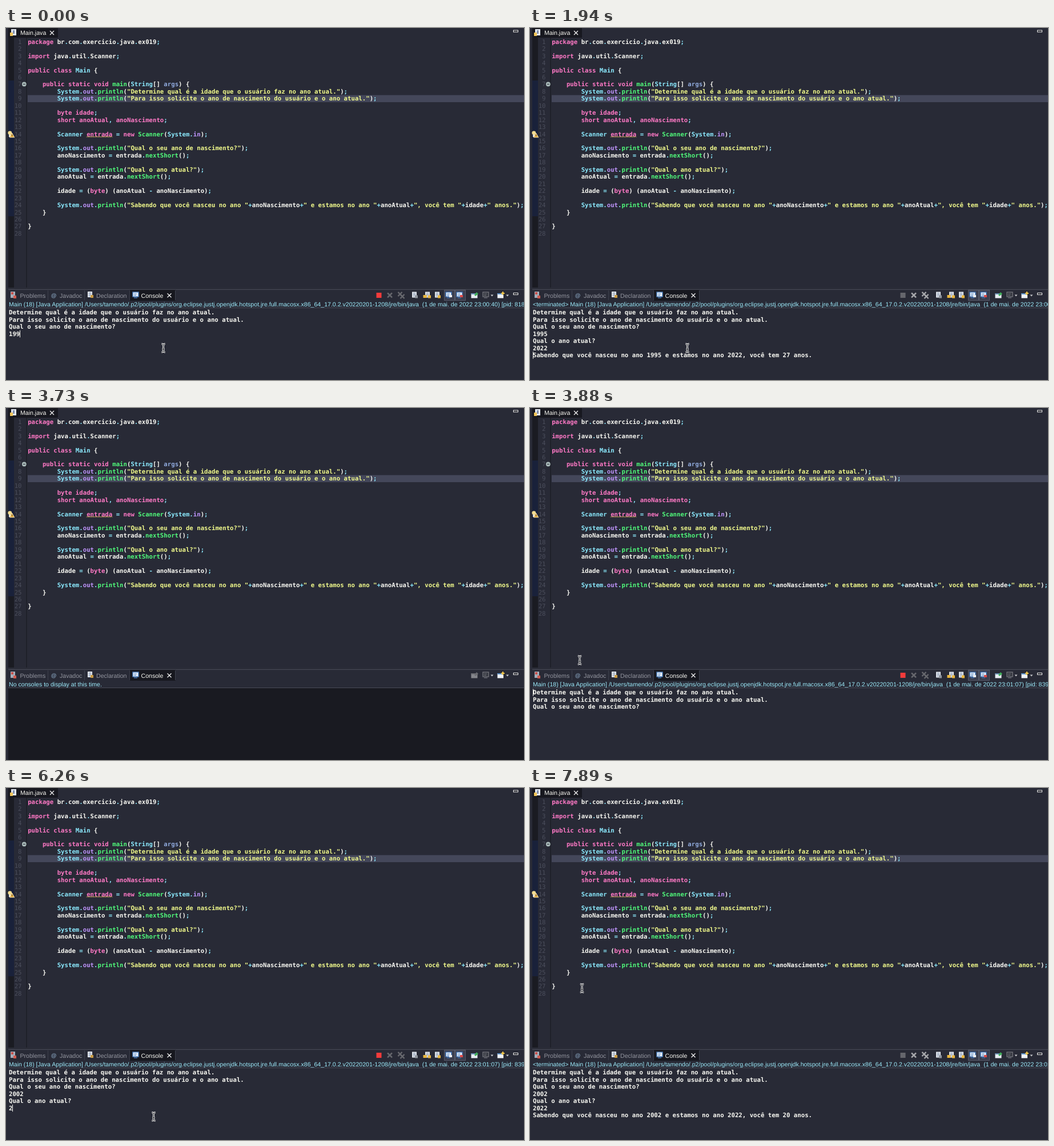
These frames come from a looping animation (907 by 617 pixels, 8 s). An HTML page:

```html
<!DOCTYPE html>
<html lang="pt-BR">
<head>
<meta charset="utf-8">
<title>Console</title>
<style>
  html, body { margin: 0; width: 100%; height: 100%; overflow: hidden; background: #282a36; }
  svg { display: block; width: 100vw; height: 100vh; }
  text { white-space: pre; text-rendering: geometricPrecision; }
  .mono { font: bold 10.7px "DejaVu Sans Mono", monospace; fill: #f8f8f2; }
  .num { font-weight: normal; fill: #4b4e5c; text-anchor: end; }
  .ui { font: 10.58px "Liberation Sans", Arial, sans-serif; fill: #93959f; }
  .status { fill: #9debfb; }
  .on { fill: #f8f8f2; }
  .key { fill: #ff79c6; } .type, .op { fill: #8be9fd; } .str { fill: #f1fa8c; }
  .fn { fill: #50fa7b; } .field { fill: #bd93f9; } .arg { fill: #8fa9dc; }
  .line { fill: none; }
</style>
</head>
<body>
<svg id="stage" viewBox="0 0 907 617" preserveAspectRatio="none"></svg>
<script>
const CHAR = 6.44, ROW = 12.45;

const code = `package br.com.exercicio.java.ex019;

import java.util.Scanner;

public class Main {

    public static void main(String[] args) {
        System.out.println("Determine qual é a idade que o usuário faz no ano atual.");
        System.out.println("Para isso solicite o ano de nascimento do usuário e o ano atual.");

        byte idade;
        short anoAtual, anoNascimento;

        Scanner entrada = new Scanner(System.in);

        System.out.println("Qual o seu ano de nascimento?");
        anoNascimento = entrada.nextShort();

        System.out.println("Qual o ano atual?");
        anoAtual = entrada.nextShort();

        idade = (byte) (anoAtual - anoNascimento);

        System.out.println("Sabendo que você nasceu no ano "+anoNascimento+" e estamos no ano "+anoAtual+", você tem "+idade+" anos.");
    }

}
`.split('\n');

const syntax = new RegExp([
  '(?<str>"[^"]*")',
  '(?<key>\\b(?:package|import|public|class|static|void|byte|short|new)\\b|idade(?=;)|anoAtual(?=,)|anoNascimento(?=;)|entrada(?= =))',
  '(?<fn>println|nextShort|\\bmain\\b|(?<=new )Scanner)',
  '(?<type>System|String|Main|(?<!\\.)Scanner)',
  '(?<field>(?<=System\\.)(?:out|in)\\b)',
  '(?<arg>\\bargs\\b)',
  '(?<op>[;.,=+-])'
].join('|'), 'g');

function highlight(line) {
  return line.replace(syntax, (token, ...rest) => {
    const groups = rest.at(-1);
    const kind = Object.keys(groups).find(name => groups[name]);
    return `<tspan class="${kind}">${token}</tspan>`;
  });
}

const rect = (x, y, w, h, fill, extra = '') =>
  `<rect x="${x}" y="${y}" width="${w}" height="${h}" fill="${fill}" ${extra}/>`;
const path = (d, stroke, width = 1, extra = '') =>
  `<path class="line" d="${d}" stroke="${stroke}" stroke-width="${width}" ${extra}/>`;
const label = (x, y, cls, content = '', id = '') =>
  `<text x="${x}" y="${y}" class="${cls}" id="${id}">${content}</text>`;
const cross = (x, y, r, stroke, width, extra) =>
  path(`M${x - r} ${y - r}l${2 * r} ${2 * r}m0 ${-2 * r}l${-2 * r} ${2 * r}`, stroke, width, extra);
const minimize = y => rect(888.5, y, 8, 3, '#17181f', 'stroke="#f0f0f0"');
const caretDown = x => `<path d="M${x - 2.5} 467.5h5l-2.5 3z" fill="#c8c8cc"/>`;
const page = (x, y, mark) =>
  rect(x, y, 8, 10, '#e8ecf2') +
  path(`M${x + 1.5} ${y + 2.5}h5m-5 2.5h5m-5 2.5h3`, '#6d7f9c') +
  rect(x + 5, y + 6, 5, 5, mark);
const monitor = (x, y, frame, screen) =>
  rect(x, y, 10, 8, screen, `stroke="${frame}" stroke-width="1.4"`) +
  path(`M${x + 2} ${y + 3}h5m-5 2.5h4`, frame) + path(`M${x + 2} ${y + 10}h6`, frame, 1.2);

// Light bulb with a warning triangle in front.
const warning = `<circle cx="6.8" cy="183.8" r="3.4" fill="#f6dd92"/>` +
  rect(5, 187, 4, 4, '#e4e2da') +
  `<path d="M10.6 184l4.2 7.8h-8.4z" fill="#eeb545" stroke="#f7e6bd" stroke-width="0.8"/>` +
  rect(10.1, 186.8, 1, 3, '#4a3a18');

function editor() {
  const rows = code.map((line, i) => {
    const y = 27.7 + i * ROW;
    return label(27.5, y, 'mono num', i + 1) + label(38.2, y, 'mono', highlight(line));
  }).join('');
  return rect(0, 0, 907, 617, '#282a36') +
    rect(4, 17, 10, 438, '#1a1b22') + rect(4, 92, 10, 238, '#19213a') +
    rect(35.5, 17, 1, 438, '#17181f') +
    rect(4, 0, 87, 17, '#17181f') +
    rect(9, 2, 9, 11, '#e4e9f1') + rect(12, 4, 3, 6, '#7f8fb0') + rect(7, 8, 5, 6, '#f0c65a') +
    label(25, 12, 'ui on', 'Main.java') + cross(80.5, 8.5, 3.5, '#f0f0f0', 1.3) + minimize(4) +
    rect(38, 117.6, 869, 12.4, '#44475a') + rows +
    `<circle cx="31.8" cy="98.5" r="3.9" fill="#a9bab9"/>` + path('M29.8 98.5h4', '#30333f', 1.2) +
    path('M141 191.5' + 'l1.5 -1.5l1.5 1.5'.repeat(15), '#f0d060', 0.9) + warning;
}

function toolbar() {
  const running = `<g id="tools">` +
    rect(648.5, 464, 9, 9, '#f23b3b', 'id="stop"') +
    `<g id="removers" stroke="#77787e">` +
    cross(672, 468.3, 4, 'inherit', 2.6, 'style="stroke:inherit"') +
    cross(690, 466.5, 3.6, 'inherit', 2.2, 'style="stroke:inherit"') +
    cross(694, 470.5, 3.6, 'inherit', 2.2, 'style="stroke:inherit"') + `</g>` +
    page(711, 462.5, '#8e939c') +
    page(734, 462.5, '#e9b63e') + rect(730.5, 468, 6, 5, '#e9b63e') +
    page(751, 462.5, '#e9b63e') +
    [767, 786].map((x, i) => rect(x + .5, 459.5, 18, 18, '#3b3e4f', 'stroke="#565968"') +
      monitor(x + 3, 463, '#3f74b8', '#f0f4fa') +
      rect(x + 9, 468, 5, 4, i ? '#d94a4a' : '#e9edf3')).join('') + `</g>`;
  return running +
    rect(814.5, 465, 11, 8.5, '#e7edf2', 'id="pinWindow"') +
    rect(814.5, 465, 11, 2, '#6a8fb5', 'id="pinBar"') +
    `<path id="pin" d="M820 468l4-5 3 3-5 4z" fill="#3fae5a"/>` +
    monitor(835, 463, '#6f7178', '#34363f') + caretDown(851) +
    rect(860.5, 465, 10.5, 8.5, '#f1f4f8') + rect(860.5, 465, 10.5, 2, '#5d94cb') +
    path('M870 462v6m-3-3h6', '#f3c548', 2) + caretDown(878) + minimize(464.5);
}

function panel() {
  return rect(0, 455, 907, 3, '#2b2d38') + rect(4, 458, 903, 1, '#484a56') +
    rect(4, 459, 903, 31, '#282a36') + rect(217, 459, 80, 19, '#17181f') +
    path('M73.5 460v17M137.5 460v17M216.5 460v17M296.5 460v17', '#3d404c') +
    rect(8, 462, 8, 11, '#a5acb8') + rect(9, 463, 4, 4, '#c9504a') + rect(13, 469, 5, 5, '#cf5a50') +
    label(24.5, 472.5, 'ui', 'Problems') +
    `<text x="79" y="472" class="ui" style="fill:#8eabc8;font-weight:bold;font-size:9.5px">@</text>` +
    label(94, 472.5, 'ui', 'Javadoc') + page(143, 462, '#c79a45') +
    label(158, 472.5, 'ui', 'Declaration') + monitor(222, 463, '#4d83c4', '#eef3fa') +
    label(236.5, 472.5, 'ui on', 'Console') + cross(286, 468.7, 3.5, '#f0f0f0', 1.3) +
    toolbar() + label(5, 488, 'ui status', '', 'status') +
    rect(4, 490, 903, 1, '#484a56') + rect(4, 491, 903, 126, '#282a36', 'id="output"') +
    Array.from({ length: 7 }, (_, i) => label(5, 502.3 + i * ROW, 'mono out')).join('') +
    rect(0, 0, 1, 12.4, '#f8f8f2', 'id="caret"');
}

const beam = 'M-3.2-7.2Q0-7 0-5V5Q0 7-3.2 7.2M3.2-7.2Q0-7 0-5M0 5Q0 7 3.2 7.2M-2.2 2h4.4';
const $ = id => document.getElementById(id);
$('stage').innerHTML = editor() + panel() +
  `<g id="mouse">${path(beam, '#f4f4f4', 3)}${path(beam, '#15161c', 1)}</g>`;

// Each step changes part of the running state; caret is [row, column].
const birth = text => ({ birth: text, caret: [3, text.length] });
const year = text => ({ year: text, caret: [5, text.length] });
const steps = [
  [0, { ...birth('199'), year: null, done: false, empty: false, mouse: [275.5, 561], clock: '23:00:40', pid: 8189 }],
  [290, birth('1995')],
  [440, { year: '', caret: [4, 0] }],
  [1040, { caret: null }],
  [1340, year('2')], [1490, year('20')], [1640, year('202')], [1790, year('2022')],
  [1940, { done: true, caret: [6, 0] }],
  [2540, { caret: null }],
  [2840, { mouse: [168, 416] }],
  [2980, { mouse: null, caret: [6, 0] }],
  [3580, { caret: null }],
  [3730, { empty: true }],
  [3880, { empty: false, done: false, birth: '', year: null, caret: [0, 0], mouse: [87, 442], clock: '23:01:07', pid: 8396 }],
  [4030, { mouse: [150, 520] }],
  [4180, { mouse: [225, 565] }],
  [4330, { mouse: [258.5, 576] }],
  [4480, { caret: [3, 0] }],
  [4930, birth('2')], [5070, birth('20')], [5520, birth('200')], [5660, birth('2002')],
  [5960, { year: '', caret: [4, 0] }],
  [6260, year('2')], [6410, year('20')], [6560, year('202')], [6860, year('2022')],
  [7000, { done: true, caret: [6, 0] }],
  [7600, { caret: null }],
  [7750, { mouse: [205, 505] }],
  [7890, { mouse: [91, 351] }]
];

function consoleLines(s) {
  if (s.empty) return [];
  const lines = [
    'Determine qual é a idade que o usuário faz no ano atual.',
    'Para isso solicite o ano de nascimento do usuário e o ano atual.',
    'Qual o seu ano de nascimento?', s.birth
  ];
  if (s.year !== null) lines.push('Qual o ano atual?', s.year);
  if (s.done) lines.push(`Sabendo que você nasceu no ano ${s.birth} e estamos no ano ${s.year}, você tem ${s.year - s.birth} anos.`);
  return lines;
}

function statusText(s) {
  if (s.empty) return 'No consoles to display at this time.';
  return (s.done ? '<terminated> ' : '') + 'Main (18) [Java Application] ' +
    '/Users/tamendo/.p2/pool/plugins/org.eclipse.justj.openjdk.hotspot.jre.full.macosx.x86_64_17.0.2.v20220201-1208/jre/bin/java' +
    `  (1 de mai. de 2022 ${s.clock}) [pid: ${s.pid}]`;
}

const show = (id, visible) => $(id).setAttribute('visibility', visible ? 'visible' : 'hidden');
const paint = (id, color, attribute = 'fill') => $(id).setAttribute(attribute, color);

function draw(s) {
  const lines = consoleLines(s);
  document.querySelectorAll('.out').forEach((row, i) => row.textContent = lines[i] || '');
  $('status').textContent = statusText(s);
  show('tools', !s.empty);
  paint('output', s.empty ? '#191a21' : '#282a36');
  paint('stop', s.done ? '#66676d' : '#f23b3b');
  paint('removers', s.done ? '#a6a7ab' : '#66676d', 'stroke');
  paint('pinWindow', s.empty ? '#85868c' : '#e7edf2');
  paint('pinBar', s.empty ? '#6b6c72' : '#6a8fb5');
  paint('pin', s.empty ? '#6b6c72' : '#3fae5a');
  show('caret', s.caret);
  if (s.caret) {
    $('caret').setAttribute('x', 5 + Math.round(s.caret[1] * CHAR));
    $('caret').setAttribute('y', 492.6 + s.caret[0] * ROW);
  }
  show('mouse', s.mouse);
  if (s.mouse) $('mouse').setAttribute('transform', `translate(${s.mouse})`);
}

let start, shown = 0;
function frame(now) {
  start ??= now;
  const time = (now - start) % 8000;
  const count = steps.filter(([at]) => at <= time).length;
  if (count !== shown) {
    shown = count;
    draw(Object.assign({}, ...steps.slice(0, count).map(([, change]) => change)));
  }
  requestAnimationFrame(frame);
}
requestAnimationFrame(frame);
</script>
</body>
</html>
```
